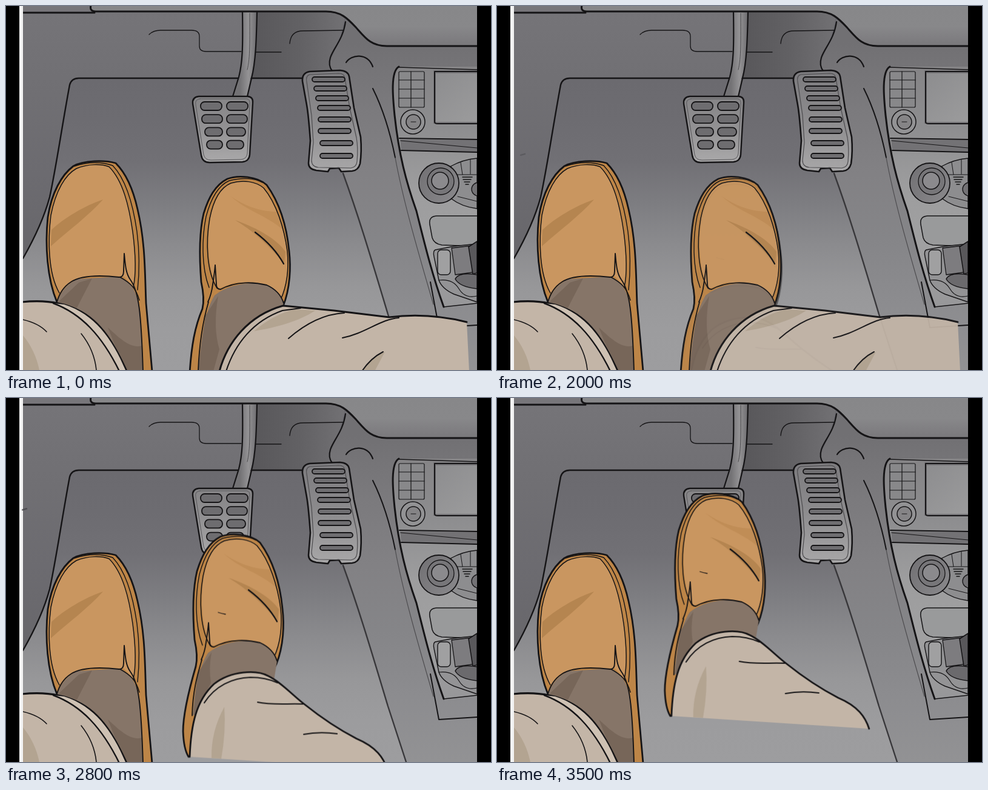
Animation, 800 px wide and 600 px high, one loop 3600 ms. Source, as an HTML page with a canvas:

```html
<!DOCTYPE html>
<html lang="en">
<head>
<meta charset="utf-8">
<title>Foot moving to the brake</title>
<style>
html, body { margin: 0; width: 100%; height: 100%; overflow: hidden; background: #000; }
canvas { display: block; }
</style>
</head>
<body>
<canvas id="stage" width="800" height="600"></canvas>
<script>
const LOOP = 3600, STEP = 100;
const INK = '#151416';
const ORANGE = '#c99660', SOLE = '#bd8547', CREASE = '#b58550';
const SOCK = '#867568', SOCK_DARK = '#776659';
const CLOTH = '#c3b5a7', CLOTH_DARK = '#b3a491';

const stage = document.getElementById('stage').getContext('2d');
let g = stage;

function fill(d, color) {
  g.fillStyle = color;
  g.fill(new Path2D(d));
}

function line(d, width = 2, color = INK) {
  g.strokeStyle = color;
  g.lineWidth = width;
  g.lineCap = g.lineJoin = 'round';
  g.stroke(new Path2D(d));
}

function shape(d, color, width = 2) {
  fill(d, color);
  line(d, width);
}

function ramp(x0, y0, x1, y1, ...stops) {
  const grad = g.createLinearGradient(x0, y0, x1, y1);
  stops.forEach((c, i) => grad.addColorStop(i / (stops.length - 1), c));
  return grad;
}

function pill(x, y, w, h, r, color, width = 2) {
  g.beginPath();
  g.roundRect(x, y, w, h, r);
  g.fillStyle = color;
  g.fill();
  g.strokeStyle = INK;
  g.lineWidth = width;
  g.stroke();
}

function disc(x, y, r, color, width = 1.5) {
  g.beginPath();
  g.arc(x, y, r, 0, Math.PI * 2);
  g.fillStyle = color;
  g.fill();
  g.strokeStyle = INK;
  g.lineWidth = width;
  g.stroke();
}

function drawFloor() {
  fill('M22 0H778V600H22Z', ramp(0, 120, 0, 600,
    '#6b6a6f', '#6d6c71', '#717075', '#7d7d81', '#8b8b8e', '#979799', '#9c9c9e', '#9d9d9f'));
  // door side and upper panel
  fill('M28 10H395V119H120Q108 119 105 130C92 200 82 270 72 315C62 352 44 388 28 416Z',
    ramp(0, 10, 0, 410, '#757478', '#706f73', '#6c6b70', '#68676b'));
  fill('M412 10H560C555 50 535 80 533 106L490 119H404Z',
    ramp(412, 0, 560, 0, '#59585b', '#626164', '#727174'));
  line('M28 416C44 388 62 352 72 315C82 270 92 200 105 130Q108 119 120 119H490', 2.4);
  line('M236 47Q243 40 255 40H306Q319 40 319 50V66Q319 75 330 75H388M412 76H454', 1.3);
  line('M468 62C469 48 476 41 490 41L556 40', 1.3);
}

function drawTunnel() {
  fill('M560 22L606 62L777 66V600H660L556 275C588 270 588 240 580 200L562 110L533 106C534 80 555 60 560 22Z',
    ramp(0, 60, 0, 600, '#717073', '#7b7a7d', '#828184', '#858588', '#8c8c8f', '#929294'));
  line('M556 276C583 350 605 425 630 508L660 600', 2.4, '#38373a');
  line('M560 26C556 55 541 68 535 85Q531 98 538 107', 2.2);
  line('M561 93C569 80 596 76 605 100', 2.2);
  line('M605 136C624 174 634 210 642 250', 2);
  line('M642 250C654 315 674 386 705 492', 1.2, '#4c4b4e');
}

function drawDash() {
  fill('M28 0H142V11H28Z', '#77767a');
  shape('M141 -4Q136 9 148 9L528 9C552 9 563 20 577 35C593 53 602 66 628 66H790V-4Z',
    ramp(0, 0, 0, 68, '#878789', '#88888a', '#78777a'), 3);
  line('M28 11H146', 3);
}

function drawConsole() {
  fill('M648 100C632 108 638 150 641 180C648 245 660 290 677 338C694 398 706 458 722 496L777 490V100Z',
    ramp(0, 100, 0, 495, '#858486', '#8d8d8f', '#9d9d9e', '#a0a0a1', '#979799'));
  fill('M650 220L777 221V241L652 238Z', '#737275');
  line('M648 101L777 105', 1.6);
  line('M649 218L777 220M652 238L777 241', 2);
  line('M651 222L777 234', 1);
  line('M648 100C634 108 638 150 641 180C648 245 660 290 677 338C690 390 702 440 722 496', 3);
  line('M722 496L777 490', 1.3);
  line('M700 455L714 530L777 526', 2);

  pill(648, 108, 42, 59, 2, '#88888a', 1.2);
  line('M668 108V167M648 122H690M648 137H690M648 152H690', 1.2);
  disc(671, 191, 20, '#929294');
  disc(672, 191, 12, '#858486');
  line('M668 191H676', 1);
  fill('M705 106H777V194H705Z', '#757477');
  fill('M709 111H777V191H709Z', ramp(709, 111, 777, 191, '#8d8d8f', '#9b9b9c'));
  line('M777 108H707V191Q707 194 712 194H777', 2);

  // climate controls
  shape('M734 264Q754 253 777 251V334Q752 331 735 318Z', '#8d8d8f', 1.4);
  line('M742 278H777M750 258L753 278M766 253V277M745 314L777 322', 1);
  disc(714, 292, 33, ramp(685, 270, 745, 315, '#737275', '#88878a'), 1.8);
  disc(717, 289, 22, '#777679', 1.3);
  disc(716, 288, 14, '#8b8a8d');
  line('M753 282H769M754 286H767M756 290H765M758 294H763', 1.5);
  disc(779, 302, 11, '#737275', 1.3);

  shape('M777 346H710Q697 347 699 360L703 382Q706 392 719 394L777 396', '#999a9b', 1.5);
  shape('M708 402Q704 404 706 413L714 452Q719 466 739 475L777 488V392L739 396Z', '#939395', 1.4);
  pill(712, 402, 21, 41, 6, '#a0a0a1', 1.4);
  shape('M735 399L768 395L777 438L741 443Z', '#7d7c7f', 1.3);
  shape('M763 397L777 388V440L770 442Z', '#59585b', 1.6);
  shape('M741 450Q747 438 777 443V466Q748 463 741 450Z', '#6b6a6d', 1.5);
  line('M714 452Q737 449 747 466T777 478', 1.2);
}

function drawPedals() {
  fill('M390 10H414C413 55 412 92 403 121L398 150H374L386 112Q391 82 390 10Z',
    ramp(386, 0, 414, 0, '#737275', '#949395', '#6d6c6f'));
  line('M390 10C391 70 390 94 384 117L374 149M414 10C413 55 412 92 405 119L398 149', 2.2);
  line('M402 12C402 55 403 85 398 105', 1, '#4d4c4f');

  shape('M318 149L399 149Q408 150 407 160L402 245Q401 256 390 257L336 258Q324 258 322 246L308 161Q307 150 318 149Z',
    ramp(0, 150, 0, 258, '#858486', '#939294', '#aaa9aa'), 2.4);
  line('M320 153L397 153Q403 154 402 162L398 243Q397 252 388 253L338 254Q328 254 326 245L313 163Q311 154 320 153Z', 1, '#59585b');
  [[321, 356, 399], [323, 357, 398], [328, 357, 395], [331, 357, 392]].forEach(([a, b, c], i) => {
    const y = 158 + i * 21.2;
    pill(a, y, b - a, 14, 6.5, '#6e6d70', 1.8);
    pill(364, y, c - 364, 14, 6.5, '#6e6d70', 1.8);
  });

  shape('M501 108L551 106Q564 107 566 116L574 168L585 216Q587 240 584 260Q581 271 571 272L553 273L549 267L534 268L531 273L512 271Q499 269 499 259L502 222Q499 180 496 163L489 124Q488 110 501 108Z',
    ramp(0, 107, 0, 273, '#7c7b7e', '#8d8c8e', '#a8a7a8'), 2.6);
  line('M501 113Q494 115 496 125L504 180L507 225L504 254Q504 265 515 266L569 267Q578 266 579 256Q581 234 578 217L567 168L559 119Q558 111 549 111Z', 1.2, '#4d4c4f');
  [[505, 121], [508, 136], [511, 152], [514, 168], [515, 187], [515, 206], [518, 226], [518, 247]]
    .forEach(([x, y]) => pill(x, y - 4, 54, 8, 4, '#6f6e71', 1.8));
}

function drawLeftLeg() {
  shape('M84 488C68 450 64 395 69 348C75 308 92 278 111 264C128 254 163 254 181 259C200 278 211 308 217 335C230 390 229 440 231 490L241 602H80Z', SOLE, 2.8);
  fill('M88 474C72 450 70 390 74 345C82 304 98 278 116 268C135 260 157 260 170 265C193 288 203 330 209 372C213 410 214 440 212 466L195 446L130 446Z', ORANGE);
  fill('M160 319C130 329 95 350 75 369L74 396C103 370 136 346 160 319Z', CREASE);
  line('M88 473C69 440 69 385 74 345C82 304 98 278 116 268C135 260 157 260 170 265C193 288 203 330 209 372C214 410 215 440 210 464', 1.5);
  line('M113 264C136 256 160 257 176 263C199 287 210 330 216 372C221 410 220 440 217 468', 1.4);

  fill('M84 490Q92 462 118 450L188 446C208 455 218 475 222 510L226 600H190Z', SOCK);
  fill('M120 456Q139 450 142 449L113 505L87 487Z', SOCK_DARK);
  fill('M196 600L168 530C190 550 206 565 224 560L226 600Z', SOCK_DARK);
  line('M84 488Q90 466 107 455C125 443 160 444 187 447Q194 447 194 437L195 408C197 430 198 441 205 451C219 470 223 505 226 602', 1.9);
  line('M188 447C205 456 215 466 220 485', 1.5);

  shape('M26 488C62 484 92 488 118 501C158 520 180 560 200 604H26Z', CLOTH, 3.2);
  fill('M28 543Q48 567 55 600H28Z', CLOTH_DARK);
  fill('M78 490C125 507 160 545 188 600L197 600C175 548 146 508 96 492Z', '#cec1b3');
  line('M78 490C124 507 158 543 187 602', 2.4);
  line('M28 517Q54 523 67 537M124 540C140 560 147 580 149 600', 1.6);
}

// Shoe in its resting place, shared by both right legs
function drawShoe(tail) {
  shape('M457 495C469 465 470 430 467 404C463 363 451 324 430 295C415 281 383 278 365 285C345 295 334 316 326 342C317 380 320 430 322 455Q328 482 324 499' + tail, SOLE, 2.8);
  fill('M350 466C334 440 331 390 337 351C343 320 354 301 371 292C391 287 411 288 424 299C444 325 457 363 463 400C466 430 463 460 454 484L424 459L378 456Z', ORANGE);
  fill('M370 313C392 329 419 339 447 339L457 369C430 345 397 338 370 313Z', '#c08d56');
  fill('M378 353C405 362 446 382 461 405L459 425C433 394 407 370 378 353Z', CREASE);
  line('M411 373C431 388 447 405 458 425', 2.3);
  line('M348 465C331 438 329 390 336 350C342 320 354 299 371 292C391 286 412 289 425 300C446 325 459 366 464 404C467 435 463 462 453 484', 1.5);
  line('M335 464C322 430 323 382 330 347C338 317 350 296 368 288C390 282 411 284 423 291', 1.4);
}

function drawShoeTop() {
  line('M333 488Q339 475 341 459Q344 440 345 427L347 459Q347 467 354 467C380 453 410 455 430 460Q452 470 458 490', 1.9);
}

function drawSeatedLeg() {
  drawShoe('C311 530 306 560 303 604H470Z');
  fill('M317 602C322 550 327 505 344 477C370 456 410 454 432 460Q452 470 458 490L420 600Z', SOCK);
  fill('M329 510L350 478Q341 530 352 566L342 602H317Z', SOCK_DARK);
  drawShoeTop();
  line('M334 488C326 515 319 550 317 602', 1.8);
  fill('M352 602C365 554 400 510 457 494L541 502L632 513C680 507 720 511 760 521L764 602Z', CLOTH);
  fill('M409 536C445 530 483 520 510 502L476 500Q440 509 409 536Z', CLOTH_DARK);
  fill('M587 600Q605 578 625 570L608 602Z', CLOTH_DARK);
  line('M352 602C365 554 400 510 457 494L541 502L632 513C680 507 720 511 760 521', 3);
  line('M363 602C378 556 408 519 456 502L486 498', 2.1);
  line('M466 548C490 527 520 508 558 506M555 547C592 540 618 516 648 514M587 602Q602 580 622 570', 2);
}

// Lifted leg, placed as it is when the foot has just left the floor
function drawLiftedLeg() {
  g.save();
  g.translate(-4, -26);
  drawShoe('C315 530 303 575 303 606Q304 635 312 648L440 530Z');
  fill('M319 580C322 540 327 505 344 477C370 456 410 454 432 460Q452 470 458 490L452 528Z', SOCK);
  fill('M327 510L350 476Q345 502 349 526L320 580Z', SOCK_DARK);
  drawShoeTop();
  line('M334 488C326 515 319 540 318 580', 1.8);
  line('M361 410Q367 412 373 413', 1.3);
  g.restore();

  const edge = 'M310 622C312 570 320 530 350 502C378 480 420 478 440 489C462 500 480 521 500 536C530 560 560 579 585 592C618 606 630 624 636 643';
  fill(edge + 'Z', CLOTH);
  fill('M367 540Q345 580 346 624L362 625Q370 580 367 540Z', CLOTH_DARK);
  line(edge, 2.8);
  line('M334 533C352 505 380 492 410 491Q435 491 455 500', 2);
  line('M422 532C445 537 470 534 497 535M498 585Q524 580 553 584', 2);
  line('M34 215L41 213', 2.2, '#47464a');
}

function layer(paint) {
  const c = document.createElement('canvas');
  c.width = 800;
  c.height = 760;
  g = c.getContext('2d');
  paint();
  g = stage;
  return c;
}

const room = layer(() => {
  drawFloor();
  drawTunnel();
  drawConsole();
  drawPedals();
  drawDash();
});
const left = layer(drawLeftLeg);
const seated = layer(drawSeatedLeg);
const lifted = layer(drawLiftedLeg);

const clamp = v => Math.max(0, Math.min(1, v));

// Distance travelled: speeds up, runs evenly, then slows a little
function travel(t) {
  const s = Math.max(0, (t - 2000) / 100);
  if (s < 4) return 1.29 * s * s;
  const late = Math.max(0, s - 11);
  return 20.6 + 10.2 * (s - 4) - 0.26 * late * late;
}

function draw(t) {
  g.fillStyle = '#000';
  g.fillRect(0, 0, 800, 600);
  g.save();
  g.beginPath();
  g.rect(22, 0, 755, 600);
  g.clip();
  g.drawImage(room, 0, 0);
  g.fillStyle = '#f4f4f4';
  g.fillRect(22, 0, 6, 600);

  const fade = clamp((t - 1900) / 400);
  if (fade > 0) {
    const up = travel(t) - 30.8;
    const across = up < 0 ? up * 0.165 : up * 0.228;
    g.globalAlpha = clamp(fade * 2);
    g.drawImage(lifted, -across, -up);
  }
  if (fade < 1) {
    g.globalAlpha = 1 - fade * fade;
    g.drawImage(seated, 0, 0);
  }
  g.globalAlpha = 1;
  g.save();
  g.beginPath();
  g.rect(28, 0, 749, 600);
  g.clip();
  g.drawImage(left, 0, 0);
  g.restore();
  g.restore();
}

const start = performance.now();
function tick() {
  const t = (performance.now() - start) % LOOP;
  draw(Math.floor((t + 4) / STEP) * STEP % LOOP);
  requestAnimationFrame(tick);
}
tick();
</script>
</body>
</html>
```
